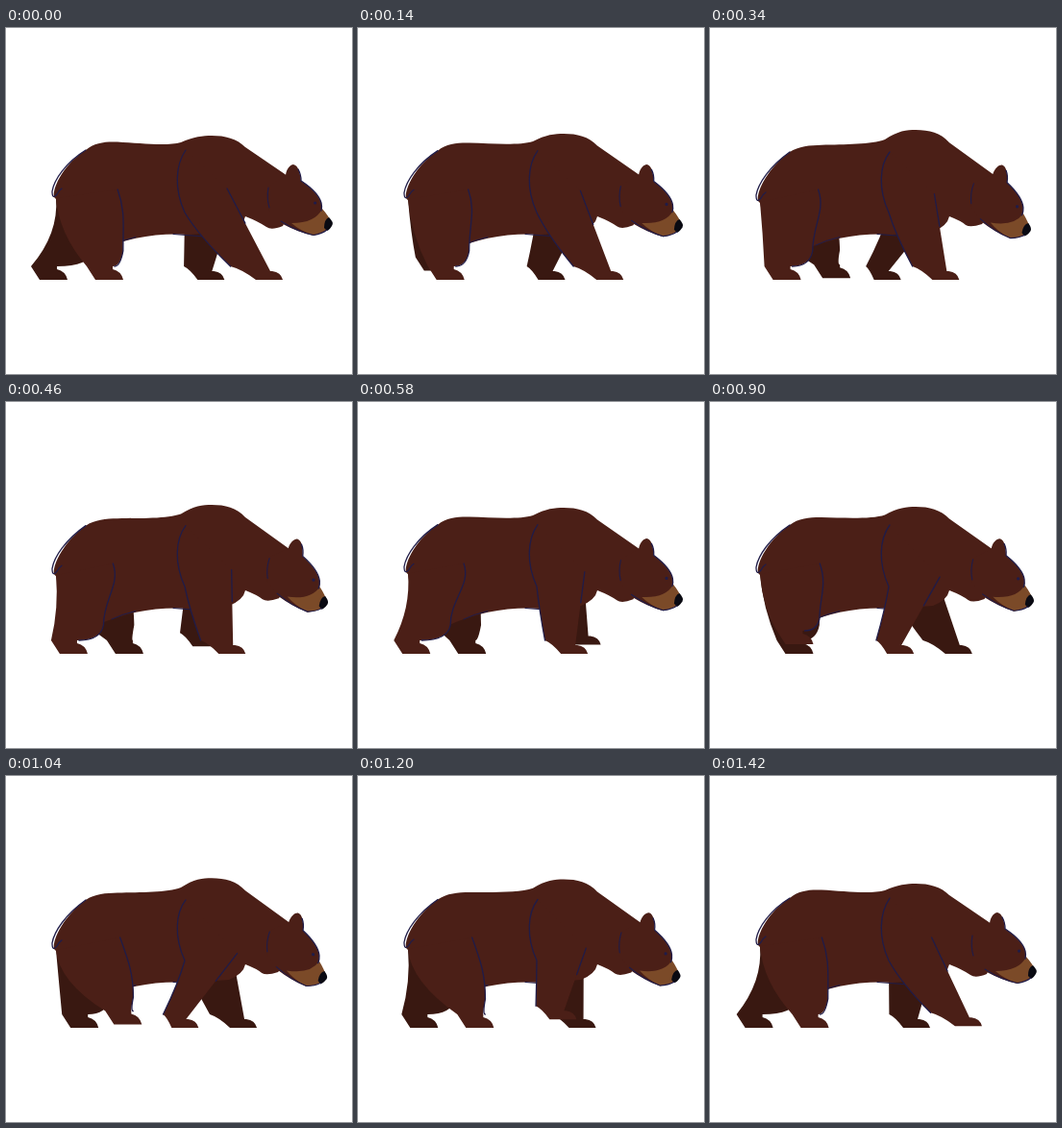
Write an HTML page with a canvas that moves like this. It is 360 px wide and 360 px high and loops after 1440 ms.

```html
<!DOCTYPE html>
<html lang="en">
<head>
<meta charset="utf-8">
<title>Walking bear</title>
<style>
  html, body { margin: 0; height: 100%; overflow: hidden; background: #fff; }
  canvas { display: block; }
</style>
</head>
<body>
<canvas id="stage" width="360" height="360"></canvas>
<script>
const ctx = document.getElementById('stage').getContext('2d');
const LOOP = 1440, STEP = 20, GROUND = 262, SWING = 0.25;
const FUR = '#4b1f17', SHADE = '#391811', MUZZLE = '#7b4a28', NOSE = '#0a0a12', LINE = '#201c48';

const fill = (d, color) => { ctx.fillStyle = color; ctx.fill(new Path2D(d)); };
const stroke = (d, width = 1.3) => {
  ctx.strokeStyle = LINE;
  ctx.lineWidth = width;
  ctx.stroke(new Path2D(d));
};

// Quick lifted swing forward, then a steady slide back on the ground
function footAt(t, start, back, front) {
  const p = ((t - start + LOOP) % LOOP) / LOOP;
  if (p < SWING) {
    const s = p / SWING;
    return { x: back + (front - back) * s, y: GROUND - 10 * Math.sin(Math.PI * s) };
  }
  return { x: front + (back - front) * (p - SWING) / (1 - SWING), y: GROUND };
}

function hindLeg(t, start, near, rise) {
  const { x, y } = footAt(t, start, 35, 122);
  const knee = 96 + (x - 46) * 0.55;
  const thigh = 115 + (x - 46) * 0.13;
  const lift = (GROUND - y) * 0.6;
  const shin = `Q${knee - 3} ${y - 14} ${knee} ${232 - lift}
    C${knee} 205 ${thigh + 3} 190 ${thigh - 5} 168`;
  fill(`M52 ${177 + rise} Q55 214 ${x - 9} ${y - 14} L${x} ${y} H${x + 29}
    Q${x + 27} ${y - 9} ${x + 18} ${y - 11} V${y - 14} ${shin}Z`, near ? FUR : SHADE);
  if (near) stroke(`M${x + 20} ${y - 14} ${shin}`);
}

function frontLeg(t, start, near, rise) {
  const { x, y } = footAt(t, start, 169, 260);
  const reach = 8 + (x - 168) * 0.2;
  const heel = x - reach;
  const topX = 230 + (260 - x) * 0.12, topY = 167 + (260 - x) * 0.2;
  const ankleX = x + 15, ankleY = y - 9;
  const back = `M187 ${127 + rise * 0.5} C176 143 175 168 186 192
    Q${186 + (heel - 186) * 0.3} 216 ${heel} ${y - 14}`;
  fill(`${back} Q${x - reach * 0.55} ${y - 11} ${x} ${y} H${x + 28}
    Q${x + 26} ${y - 8} ${ankleX + 2} ${ankleY} H${ankleX} L${topX} ${topY}Z`, near ? FUR : SHADE);
  if (near) {
    stroke(back);
    stroke(`M${topX} ${topY} L${topX + (ankleX - topX) * 0.42} ${topY + (ankleY - topY) * 0.42}`);
  }
}

function body(u) {
  const r = 4 * u, h = -6 * u;
  const rump = `C48 ${165 + r} 62 ${140 + r} 83 ${127 + r * 0.5}`;
  fill(`M50 ${176 + r} ${rump}
    C92 ${119 + r} 104 ${118 + r} 116 ${118.5 + r * 0.8}
    C140 ${120 + r * 0.3} 168 ${123 + h * 0.3} 182 ${119 + h * 0.5}
    C195 ${113 + h} 205 ${112 + h} 214 ${112 + h}
    C228 ${112 + h} 240 ${115 + h} 249 ${124 + h * 0.8}
    L${293 + 4 * u} 154 L300 180 L${288 - 5 * u} ${206 - 2 * u}
    Q${276 - 5 * u} ${211 - 3 * u} ${271 - 5 * u} ${207 - 2 * u}
    Q262 201 249 196 Q247 206 232 212 L190 215 Q140 212 95 232 L52 ${178 + r}Z`, FUR);
  stroke(`M110 226 Q120 221 135 217.5 M174 214.5 L207 217`, 1);
  stroke(`M83 ${127 + r * 0.5} C62 ${140 + r} 50 ${158 + r} 48 ${170 + r}
    Q48 ${179 + r} 53 ${173 + r} Q55 ${169 + r} 58 ${167 + r}`);
}

function head(u) {
  ctx.save();
  ctx.translate(298, 172);
  ctx.rotate(u * 0.17);
  ctx.translate(-298, -172);
  fill(`M273 165 L291 153 C292 146 296 142 299 142 C304 143 306 150 307 159
    C316 165 326 174 328 182 L329 190 L339 203 Q337 211 320 216 Q303 212 288 204 L274 190Z`, FUR);
  fill('M297 203 Q322 203 329 188 Q336 196 339 203 Q337 212 320 215.5 Q306 211 297 203Z', MUZZLE);
  fill('M331 208 Q331 199 336 197 Q341 202 339.5 205 Q337 210 334 211Z', NOSE);
  stroke('M304 147 Q307 152 307 159 C316 165 326 174 328 182 Q329 186 328 190');
  stroke('M273 166 Q271 177 274 187 M286 201 Q303 212 320 215.5 Q329 214 334 210', 1.1);
  fill('M320 182 a1.6 1.6 0 1 0 3.2 0 a1.6 1.6 0 1 0 -3.2 0Z', LINE);
  ctx.restore();
}

function draw(now) {
  const t = Math.floor((now % LOOP) / STEP) * STEP;
  const u = (1 - Math.cos(4 * Math.PI * t / LOOP)) / 2;
  ctx.fillStyle = '#fff';
  ctx.fillRect(0, 0, 360, 360);
  ctx.lineCap = ctx.lineJoin = 'round';
  hindLeg(t, 0, false, 4 * u);
  frontLeg(t, 360, false, 4 * u);
  body(u);
  hindLeg(t, 720, true, 4 * u);
  frontLeg(t, 1080, true, 4 * u);
  head(u);
}

const began = performance.now();
function tick() {
  draw(performance.now() - began);
  requestAnimationFrame(tick);
}
tick();
</script>
</body>
</html>
```
